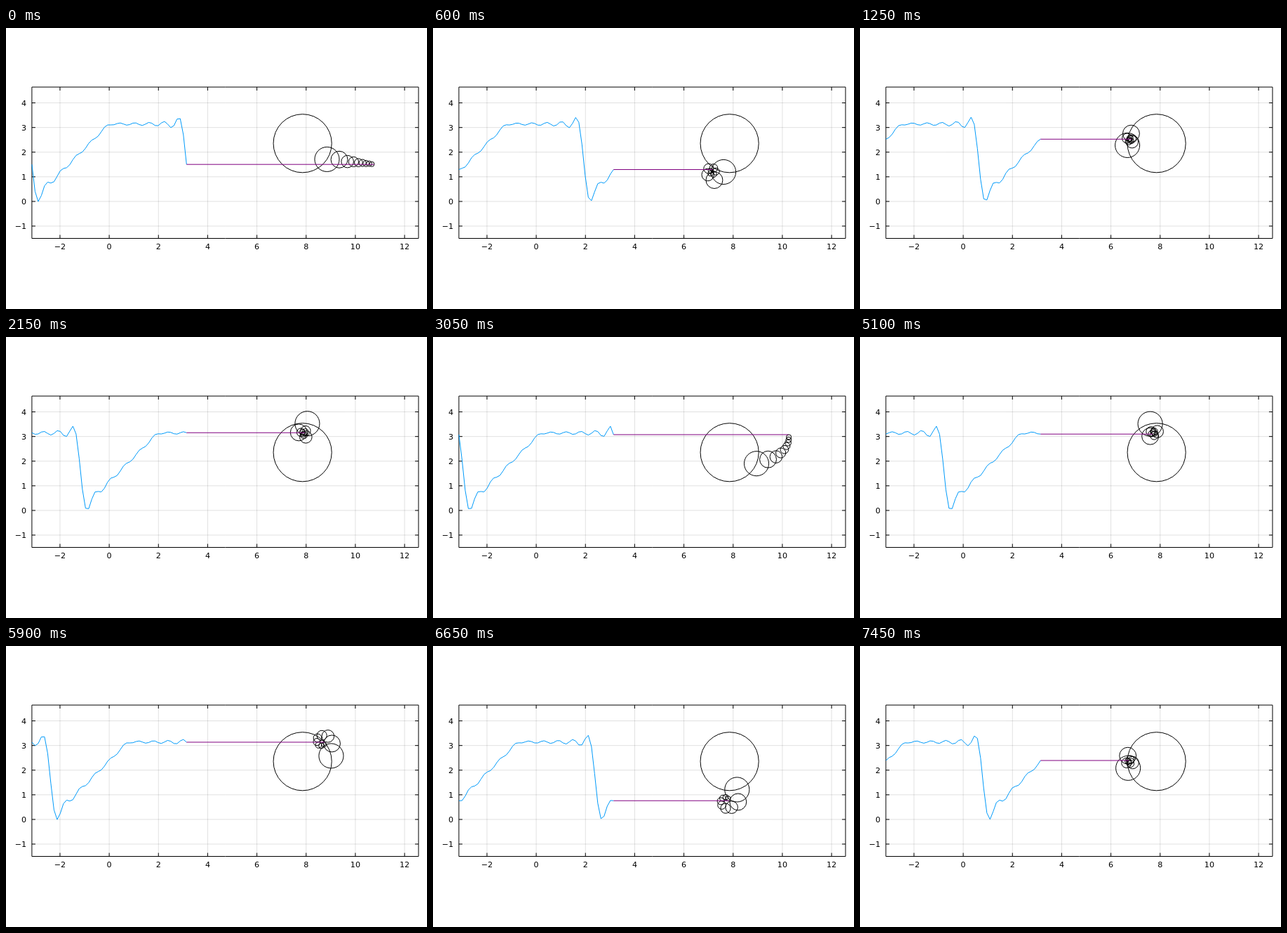
Animation of 600 by 400 pixels, one loop 7.5 s. Source, as an HTML page with a canvas:

```html
<!DOCTYPE html>
<html lang="en">
<head>
<meta charset="utf-8">
<title>Fourier epicycles</title>
<style>
html, body { margin: 0; width: 100%; height: 100%; overflow: hidden; background: #fff; }
canvas { display: block; }
</style>
</head>
<body>
<canvas id="stage" width="600" height="400"></canvas>
<script>
const ctx = document.getElementById("stage").getContext("2d");
const { PI, sin, cos, hypot } = Math;
const SCALE = 35.08, TERMS = 10, SAMPLES = 50, FRAMES = 150, FRAME_MS = 50;
const MEAN = 3 * PI / 4, HUB = 5 * PI / 2, START = 0.01;
const X = x => 147.1 + x * SCALE;
const Y = y => 246.9 - y * SCALE;
const LEFT = X(-PI), RIGHT = X(4 * PI), TOP = Y(PI + 1.5), BOTTOM = Y(-1.5);

// Coefficients of a ramp from 0 to pi followed by a plateau at pi.
const terms = Array.from({ length: TERMS }, (_, i) => {
  const n = i + 1, a = n % 2 ? 2 / (PI * n * n) : 0, b = 1 / n;
  return { n, a, b, r: hypot(a, b) };
});

// Centres of the chained circles, ending with the tip.
function chain(t) {
  const points = [[HUB, MEAN]];
  let [x, y] = points[0];
  for (const { n, a, b } of terms) {
    x += b * cos(n * t) - a * sin(n * t);
    y -= a * cos(n * t) + b * sin(n * t);
    points.push([x, y]);
  }
  return points;
}

function stroke(points, color) {
  ctx.beginPath();
  for (const [x, y] of points) ctx.lineTo(x, y);
  ctx.strokeStyle = color;
  ctx.stroke();
}

function drawAxes() {
  const grid = "rgba(0,0,0,0.12)", tick = 5;
  ctx.font = '11.1px "DejaVu Sans", sans-serif';
  ctx.fillStyle = "#000";
  const label = v => String(v).replace("-", "\u2212");
  for (let v = -2; v <= 12; v += 2) {
    const x = X(v);
    stroke([[x, TOP], [x, BOTTOM]], grid);
    stroke([[x, TOP], [x, TOP + tick]], "#000");
    stroke([[x, BOTTOM], [x, BOTTOM - tick]], "#000");
    ctx.textAlign = "center";
    ctx.fillText(label(v), x, 315);
  }
  for (let v = -1; v <= 4; v++) {
    const y = Y(v);
    stroke([[LEFT, y], [RIGHT, y]], grid);
    stroke([[LEFT, y], [LEFT + tick, y]], "#000");
    stroke([[RIGHT, y], [RIGHT - tick, y]], "#000");
    ctx.textAlign = "right";
    ctx.fillText(label(v), 29, y + 4);
  }
  ctx.strokeStyle = "#000";
  ctx.strokeRect(LEFT, TOP, RIGHT - LEFT, BOTTOM - TOP);
}

function draw(now) {
  const t = START + 0.1 * (Math.floor(now / FRAME_MS) % FRAMES);
  const points = chain(t), [tipX, tipY] = points[TERMS];
  ctx.fillStyle = "#fff";
  ctx.fillRect(0, 0, 600, 400);
  ctx.lineWidth = 1;
  ctx.lineJoin = "round";
  drawAxes();

  const wave = Array.from({ length: SAMPLES }, (_, k) => {
    const x = -PI + 2 * PI * k / (SAMPLES - 1);
    return [X(x), Y(chain(t + x - PI)[TERMS][1])];
  });
  stroke(wave, "#009afa");

  ctx.strokeStyle = "#000";
  terms.forEach(({ r }, i) => {
    const [x, y] = points[i];
    ctx.beginPath();
    ctx.arc(X(x), Y(y), r * SCALE, 0, 2 * PI);
    ctx.stroke();
  });
  stroke([[X(PI), Y(tipY)], [X(tipX), Y(tipY)]], "#800080");
}

const begin = performance.now();
function loop() {
  draw(performance.now() - begin);
  requestAnimationFrame(loop);
}
loop();
</script>
</body>
</html>
```
